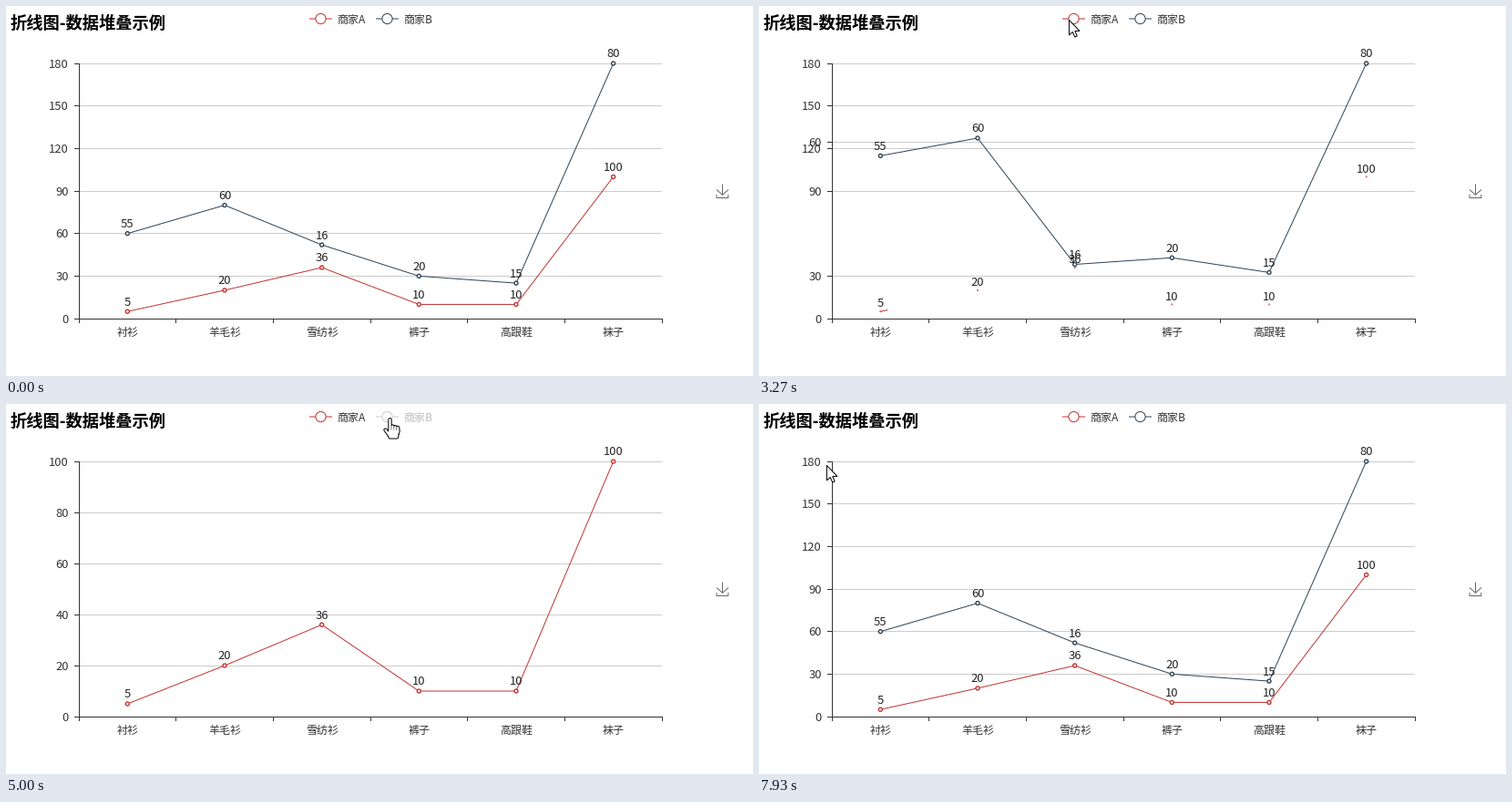
Recreate the animation shown at these times as a matplotlib script. Size 820 by 406 pixels, loop 8000 ms.

```python
import matplotlib.pyplot as plt
import numpy as np
from matplotlib.animation import FuncAnimation
from matplotlib.colors import to_rgb
from matplotlib.patches import Circle, Polygon

W, H, DPI = 820, 406, 64
PX = 72 / DPI
LOOP, INTERVAL = 8000, 25
STEP = LOOP / 120              # the chart repaints 15 times a second

LEFT, RIGHT, TOP, BASE = 80, 720, 63, 343
RED, NAVY, OFF, INK = "#c23531", "#2f4554", "#cccccc", "#333333"
CATS = ["衬衫", "羊毛衫", "雪纺衫", "裤子", "高跟鞋", "袜子"]
A = np.array([5, 20, 36, 10, 10, 100])
B = np.array([55, 60, 16, 20, 15, 80])
XS = LEFT + (np.arange(6) + 0.5) * (RIGHT - LEFT) / 6

# Legend clicks: hide A, show A, hide B, show B
CLICKS = [2009, 3252, 4715, 5833]
PHASES = ["AB", "B", "AB", "A", "AB"]
SCALES = {"AB": (180, 30), "B": (80, 20), "A": (100, 20)}
HOVER = {"A": 1420, "B": 4350}
SPAN = {"A": CLICKS[:2], "B": CLICKS[2:]}

# Pointer moves: leave, arrive, x, y
ENTRY = (400, 381)
MOVES = [(800, 1450, 340, 15), (4000, 4330, 421, 15),
         (5990, 6860, 663, 70), (7400, 7930, 74, 67)]
ARROW = [(0, 0), (0, 16.5), (3.8, 13), (6.3, 18.6), (8.8, 17.5),
         (6.4, 12), (11.6, 12)]

plt.rcParams["font.family"] = ["Noto Sans CJK JP", "DejaVu Sans"]
fig = plt.figure(figsize=(W / DPI, H / DPI), dpi=DPI, facecolor="white")
ax = fig.add_axes([0, 0, 1, 1])
ax.set(xlim=(0, W), ylim=(H, 0))
ax.axis("off")


def stroke(xs, ys, color=INK, z=2, lw=1, cap="butt"):
    return ax.plot(xs, ys, color=color, lw=lw * PX, zorder=z, snap=False,
                   solid_capstyle=cap)[0]


def label(x, y, s, size=12, color=INK, ha="center", **kw):
    return ax.text(x, y, s, size=size * PX, color=color, ha=ha,
                   va="baseline", zorder=5, **kw)


def ring(x, y, r, lw):
    return ax.add_patch(Circle((x, y), r, fc="white", lw=lw * PX, zorder=4))


def crisp(v):
    return np.floor(v) + 0.5


def smooth(k):
    k = np.clip(k, 0, 1)
    return k * k * (3 - 2 * k)


def cubic_out(k):
    return 1 - (1 - np.clip(k, 0, 1)) ** 3


def elastic_out(k):
    if k >= 1:
        return 1
    return 1 + 2 ** (-10 * k) * np.sin((k - 0.1) * 2 * np.pi / 0.4)


def to_y(v, top):
    return BASE - (BASE - TOP) * v / top


def brighten(color):
    return tuple(min(c * 1.1, 1) for c in to_rgb(color))


def has_tick(v, phase):
    top, gap = SCALES[phase]
    return v <= top and v % gap == 0


class Tick:
    """Grid line, axis tick and number for one value."""

    def __init__(self, v):
        self.v = v
        self.grid = stroke([LEFT, RIGHT], [0, 0], OFF, 1)
        self.mark = stroke([LEFT - 5, LEFT], [0, 0])
        self.text = label(69, 0, str(v), 13, ha="right")

    def place(self, old, new, p):
        on = has_tick(self.v, new)
        for part in (self.grid, self.mark, self.text):
            part.set_visible(on)
        if not on:
            return
        y = to_y(self.v, SCALES[new][0])
        if has_tick(self.v, old):
            y0 = to_y(self.v, SCALES[old][0])
            y = y0 + (y - y0) * p
        self.grid.set_ydata([crisp(y)] * 2)
        self.mark.set_ydata([crisp(y)] * 2)
        self.text.set_y(crisp(y) + 4.5)


class Series:
    def __init__(self, name, values, color, key_x):
        self.name, self.values, self.color = name, values, color
        self.line = stroke([], [], color, 3)
        self.dots = [ring(x, 0, 2, 1.4) for x in XS]
        self.labels = [label(x, 0, str(v), 13, "#222222")
                       for x, v in zip(XS, values)]
        self.key = stroke([key_x, key_x + 25], [14, 14], color, 3)
        self.key_ring = ring(key_x + 12.5, 14, 5.6, 1)
        # The second copy makes a switched-off name look heavier
        self.names = [label(key_x + 30, 19, "商家" + name, ha="left")
                      for _ in range(2)]

    def ys(self, phase):
        v = self.values + (A if self.name == "B" and "A" in phase else 0)
        return to_y(v, SCALES[phase][0])

    def radius(self, t):
        hover, (hide, show) = HOVER[self.name], SPAN[self.name]
        if t < hover:
            return 2
        if t < hide:
            return 2 + 3 * elastic_out((t - hover) / 400)
        if t < show:
            return 5 * (1 - cubic_out((t - hide) / 300))
        return 2 * cubic_out((t - show) / 300)

    def place(self, t, old, new, p):
        hide, show = SPAN[self.name]
        active = self.name in new
        start = old if self.name in old else new
        end = new if active else old
        y = self.ys(start) + (self.ys(end) - self.ys(start)) * p

        r = self.radius(t)
        hot = HOVER[self.name] <= t < show
        for dot, x, yy, text in zip(self.dots, XS, y, self.labels):
            dot.set(center=(x, yy), radius=r,
                    edgecolor=brighten(self.color) if hot else self.color,
                    visible=active or t < hide + 300)
            text.set(y=yy - r - 4.6, visible=active)

        # A series that comes back is wiped in from the left
        wipe = min((t - show) / 1000, 1) if t >= show else 1
        edge = XS[0] + (XS[-1] - XS[0]) * wipe
        keep = XS < edge
        self.line.set_data(np.append(XS[keep], edge),
                           np.append(y[keep], np.interp(edge, XS, y)))
        self.line.set_visible(active)

        self.key.set_color(self.color if active else OFF)
        self.key_ring.set_edgecolor(self.color if active else OFF)
        for text in self.names:
            text.set_color(INK if active else OFF)
        self.names[1].set_visible(not active)


class Pointer:
    """An arrow, or over the legend a hand built from round-ended bars."""

    def __init__(self):
        self.arrow = ax.add_patch(Polygon(ARROW, fc="white", ec="black",
                                          lw=PX, zorder=9))
        self.hand = [stroke([], [], "black", 9, 4.4, "round"),
                     stroke([], [], "white", 10, 2.4, "round")]
        bars = [(-5, 13.5, 0, 20)]
        bars += [(2.9 * i, 8.8 + 0.7 * i if i else 2.2, 2.9 * i, 16)
                 for i in range(4)]
        bars += [(0, y, 8.7 - 0.4 * i, y)
                 for i, y in enumerate(np.linspace(15, 21.3, 4))]
        self.bars = np.array([(*bar, np.nan, np.nan) for bar in bars])

    def place(self, t):
        pos = np.array(ENTRY, float)
        for leave, arrive, x, y in MOVES:
            pos += (np.array([x, y]) - pos) * smooth((t - leave)
                                                     / (arrive - leave))
        x, y = pos
        over = 8 <= y <= 22 and (333 <= x <= 396 or 406 <= x <= 468)
        hand = over and not CLICKS[1] <= t < 4050
        self.arrow.set(xy=np.array(ARROW) + pos + 0.4,
                       visible=t >= MOVES[0][0] - 1 and not hand)
        for line in self.hand:
            line.set_data(self.bars[:, ::2].ravel() + x + 0.5,
                          self.bars[:, 1::2].ravel() + y)
            line.set_visible(hand)


def draw_frame():
    label(5, 25, "折线图-数据堆叠示例", 18.25, "#000000", "left",
          weight="bold")
    stroke([LEFT + 0.5] * 2, [TOP, BASE + 1])
    stroke([LEFT, RIGHT + 1], [crisp(BASE)] * 2)
    for x in np.linspace(LEFT, RIGHT, 7):
        stroke([crisp(x)] * 2, [BASE, BASE + 5])
    for x, s in zip(XS, CATS):
        label(x, 362, s)
    # Download icon
    x, y = 786.5, 195.5
    stroke([x, x], [y, y + 11.7], "#666666")
    stroke([x - 6.5, x, x + 6.5], [y + 6, y + 11.8, y + 6], "#666666")
    stroke([x - 6.5, x - 6.5, x + 6.3, x + 6.3],
           [y + 11.3, y + 15, y + 15, y + 11.3], "#666666")


draw_frame()
ticks = [Tick(v) for v in range(0, 181, 10)
         if any(has_tick(v, p) for p in SCALES)]
series = [Series("A", A, RED, 333), Series("B", B, NAVY, 406)]
pointer = Pointer()


def update(i):
    t = int((i * INTERVAL + 18) / STEP) * STEP
    n = sum(t >= c for c in CLICKS)
    new, old = PHASES[n], PHASES[max(n - 1, 0)]
    p = cubic_out((t - CLICKS[n - 1]) / 300) if n else 1
    for part in ticks + series:
        if isinstance(part, Tick):
            part.place(old, new, p)
        else:
            part.place(t, old, new, p)
    pointer.place(t)
    return []


anim = FuncAnimation(fig, update, frames=LOOP // INTERVAL, interval=INTERVAL,
                     init_func=lambda: update(0), repeat=True, repeat_delay=0)
plt.show()
```
